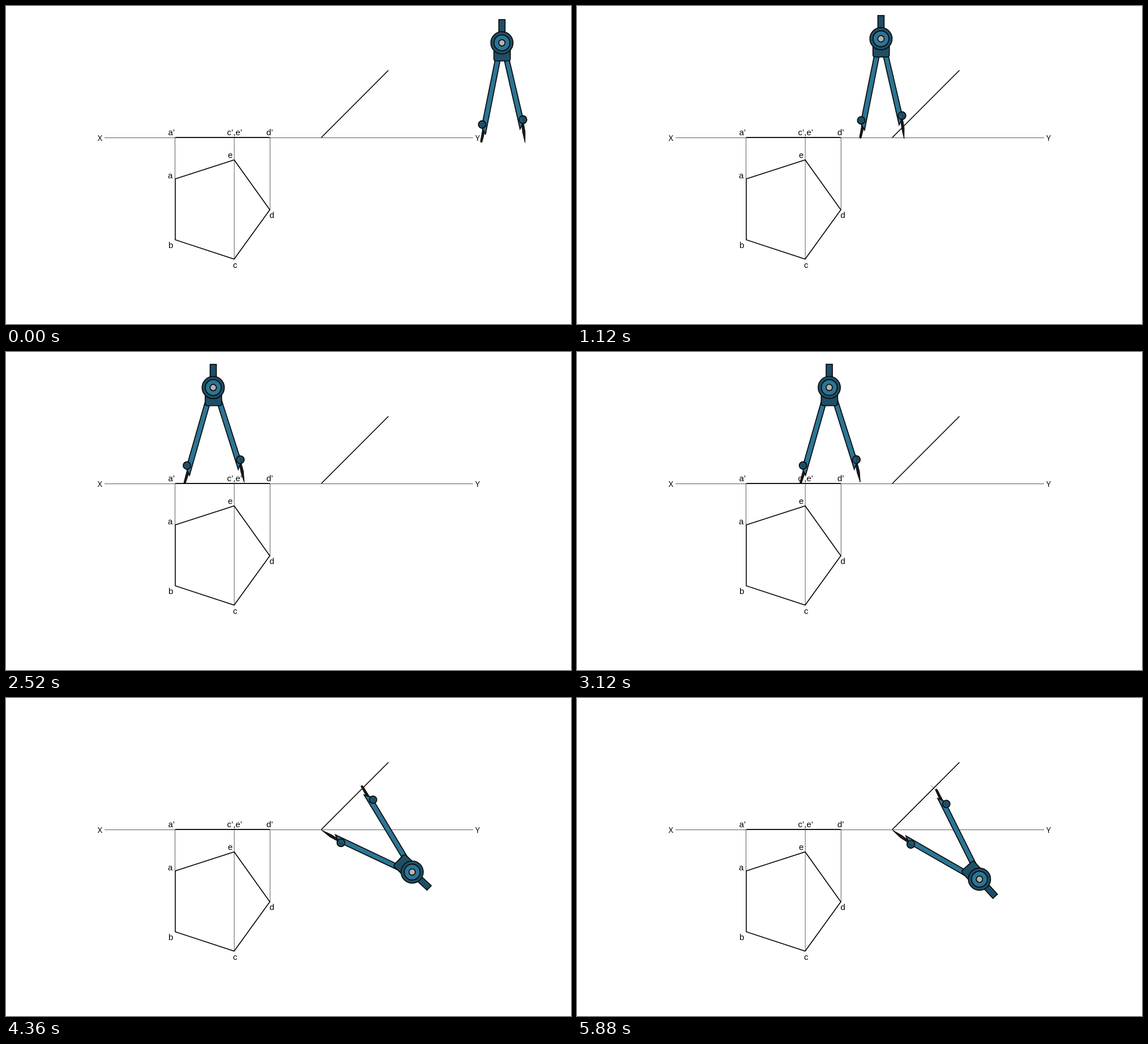
Recreate the animation shown at these times as an HTML page. Size 998x561 px, loop 5920 ms.

```html
<!DOCTYPE html>
<html lang="en">
<head>
<meta charset="utf-8">
<title>Compass construction</title>
<style>
html, body { margin: 0; width: 100%; height: 100%; overflow: hidden; background: #fff; }
svg { display: block; width: 998px; height: 561px; }
text { font: 15px "Liberation Sans", Arial, sans-serif; }
.axis text { font: 14px "Noto Sans", sans-serif; }
.thin { fill: none; stroke: #333; stroke-width: .8; }
.bold { fill: none; stroke: #000; stroke-width: 1.6; }
#compass { stroke: #0a0a0a; stroke-width: 1.7; }
.dark { fill: #1d4f66; }
.light { fill: #2c7595; }
.needle { fill: #1a1a1a; stroke-width: 1; }
</style>
</head>
<body>
<svg viewBox="0 0 998 561">
  <g class="axis">
    <path class="thin" d="M174 232.5H825"/>
    <text x="161.7" y="238">X</text>
    <text x="829" y="238">Y</text>
  </g>
  <path class="thin" d="M298.5 232V305M403.2 232V446M466.4 232V360"/>
  <path class="bold" d="M299 231.8H466M557 232L675.5 113.5"/>
  <path class="bold" d="M299 305L403 271.5L466 359.5L403 446.5L299 412.5Z"/>
  <text x="286.5" y="228">a’</text>
  <text x="390.5" y="228">c’,e’</text>
  <text x="460" y="228">d’</text>
  <text x="286" y="303.5">a</text>
  <text x="287" y="427">b</text>
  <text x="401" y="461.5">c</text>
  <text x="465.5" y="373.5">d</text>
  <text x="392" y="267.5">e</text>
  <path id="arc" class="thin"/>
  <g id="compass">
    <g id="left">
      <path class="needle" d="M-34 152L-38 174Q-37 177 -35 175L-30 155Z"/>
      <path class="light" d="M-10 20L-1 20L-29 161L-36 149Z"/>
      <circle class="dark" cx="-35" cy="144" r="6.6"/>
    </g>
    <g id="right">
      <path class="needle" d="M35 145L38 140L41 157L40.8 176L36.5 158Z"/>
      <circle class="dark" cx="37" cy="135.5" r="6.8"/>
      <path class="light" d="M1.7 20L10.7 20L38.5 139L32 152Z"/>
      <circle class="dark" cx="37" cy="135.5" r="6.8" fill-opacity=".75"/>
    </g>
    <path class="dark" d="M-14.2 8H14.8V28Q14.8 32 10.8 32H-10.2Q-14.2 32 -14.2 28Z"/>
    <rect class="dark" x="-5.5" y="-41" width="11" height="24"/>
    <circle class="dark" r="19.6"/>
    <circle class="light" r="14"/>
    <circle r="5.6" fill="#b4b4b0"/>
  </g>
</svg>
<script>
const LOOP = 5920, STEP = 40, SWING = 3880;
const PIVOT = [556.7, 232], TIP = [54.5, 168.8], RADIUS = 103.5;
const byId = id => document.getElementById(id);
const [compass, left, right, arc] = ['compass', 'left', 'right', 'arc'].map(byId);

const part = (t, from, to) => Math.min(1, Math.max(0, (t - from) / (to - from)));
const quad = p => p < .5 ? 2 * p * p : 1 - 2 * (1 - p) ** 2;
const sine = p => (1 - Math.cos(Math.PI * p)) / 2;
const mix = (a, b, p) => a + (b - a) * p;

function onArc(deg) {
  const a = deg * Math.PI / 180;
  return [PIVOT[0] - RADIUS * Math.cos(a), PIVOT[1] - RADIUS * Math.sin(a)];
}

function draw(t) {
  const arrive = quad(part(t, 120, 1820));
  const open = sine(part(t, 1820, 2160));
  const carry = sine(part(t, 2160, 3800));

  left.setAttribute('transform', `translate(0 ${-3.2 * open}) rotate(${4.6 * open})`);
  right.setAttribute('transform', `translate(0 ${-4.8 * open}) rotate(${-4.6 * open})`);

  if (t < SWING) {
    const x = mix(876, 363, arrive) - 14.5 * open + 153.5 * carry;
    const y = mix(65, 54.1, arrive) + 8.7 * open - .3 * carry;
    compass.setAttribute('transform', `translate(${x} ${y})`);
    arc.setAttribute('d', '');
  } else {
    // Swing around the fixed needle while the other tip marks the arc
    const turn = mix(131.5, 137.5, part(t, SWING, 5880));
    compass.setAttribute('transform',
      `translate(${PIVOT}) rotate(${turn}) translate(${-TIP[0]} ${-TIP[1]})`);
    arc.setAttribute('d', `M${onArc(131.5)}A${RADIUS} ${RADIUS} 0 0 1 ${onArc(turn)}`);
  }
}

const start = performance.now();
function tick() {
  const t = (performance.now() - start) % LOOP;
  draw(Math.floor(t / STEP) * STEP);
  requestAnimationFrame(tick);
}
tick();
</script>
</body>
</html>
```
